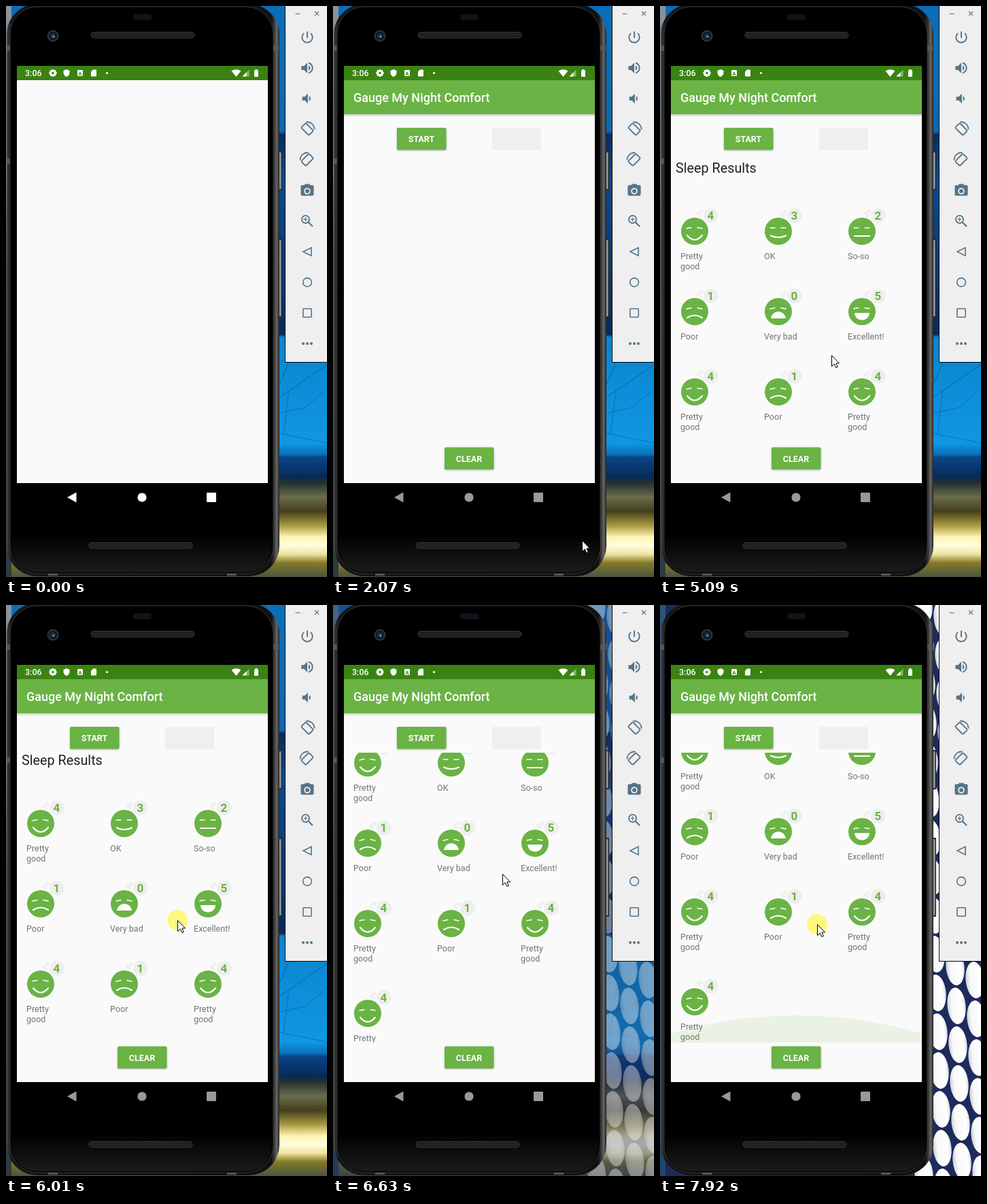
An HTML page with a canvas for the animation above (8000 ms loop, 472 by 839 pixels).

```html
<!DOCTYPE html>
<html lang="en">
<head>
<meta charset="utf-8">
<title>Sleep tracker</title>
<style>
html, body { margin: 0; width: 100%; height: 100%; overflow: hidden; background: #000; }
canvas { display: block; width: 472px; height: 839px; }
</style>
</head>
<body>
<canvas id="stage" width="472" height="839"></canvas>
<script>
const W = 472, H = 839, LOOP = 8000;
const GREEN = '#6ab344', SLATE = '#567487';
const canvas = document.getElementById('stage');
const c = canvas.getContext('2d');

// Bursts of screen updates: start, end, number of steps
const BURSTS = [
  [0, 0, 1], [220, 460, 4], [680, 770, 2], [1070, 1070, 1], [1690, 1690, 1],
  [1840, 1920, 2], [2070, 2070, 1], [2230, 2230, 1], [2760, 3380, 9],
  [3840, 4450, 9], [4770, 5090, 5], [5540, 5540, 1], [5690, 6470, 11],
  [6630, 6630, 1], [6810, 7140, 7], [7310, 7770, 7], [7920, 7920, 1]
];
const POINTER = [
  [220, 346, 825], [460, 366, 785], [2680, 366, 785], [3070, 300, 560],
  [3215, 274, 482], [3380, 284, 521], [3760, 284, 521], [3840, 243, 505],
  [4140, 113, 390], [4450, 284, 422], [4700, 284, 422], [5090, 252, 513],
  [5610, 252, 513], [6002, 252, 463], [6392, 250, 402], [6470, 249, 393],
  [6630, 249, 395], [6920, 242, 523], [7140, 238, 535], [7235, 238, 535],
  [7770, 231, 469]
];
const SCROLL = [
  [5850, 0], [6002, 10], [6392, 81], [6470, 92], [6630, 99], [6920, 104],
  [7310, 104], [7770, 116]
];
const NAV = [[600, 255], [680, 215], [770, 175], [1070, 153]];
const APP = [[1600, 0], [1690, .5], [1840, .85], [1920, 1]];
const WALL = [[6560, 0], [6630, .4], [6920, 1]];
const GLOW = [[7400, 0], [7770, 1]];

const ICONS = {
  power: 'M13 3h-2v10h2V3zm4.83 2.17l-1.42 1.42C17.99 7.86 19 9.81 19 12c0 3.87-3.13 7-7 7s-7-3.13-7-7c0-2.19 1.01-4.14 2.58-5.42L6.17 5.17C4.23 6.82 3 9.26 3 12c0 4.97 4.03 9 9 9s9-4.03 9-9c0-2.74-1.23-5.18-3.17-6.83z',
  louder: 'M3 9v6h4l5 5V4L7 9H3zm13.5 3c0-1.77-1.02-3.29-2.5-4.03v8.05c1.48-.73 2.5-2.25 2.5-4.02zM14 3.23v2.06c2.89.86 5 3.54 5 6.71s-2.11 5.85-5 6.71v2.06c4.01-.91 7-4.49 7-8.77s-2.99-7.86-7-8.77z',
  quieter: 'M18.5 12c0-1.77-1.02-3.29-2.5-4.03v8.05c1.48-.73 2.5-2.25 2.5-4.02zM5 9v6h4l5 5V4L9 9H5z',
  camera: 'M9 2L7.17 4H4c-1.1 0-2 .9-2 2v12c0 1.1.9 2 2 2h16c1.1 0 2-.9 2-2V6c0-1.1-.9-2-2-2h-3.17L15 2H9z',
  shield: 'M12 1L3 5v6c0 5.55 3.84 10.74 9 12 5.16-1.26 9-6.45 9-12V5z',
  card: 'M18 2h-8L4 8v12c0 1.1.9 2 2 2h12c1.1 0 2-.9 2-2V4c0-1.1-.9-2-2-2z'
};

function snap(t) {
  const [a, b, n] = BURSTS.filter(s => s[0] <= t).pop();
  if (n === 1 || t >= b) return b;
  const d = (b - a) / (n - 1);
  return a + Math.floor((t - a + 15) / d) * d;
}

// Linear value of a keyed track at time t
function at(keys, t, k = 1) {
  if (t <= keys[0][0]) return keys[0][k];
  const i = keys.findIndex(p => p[0] >= t);
  if (i < 0) return keys[keys.length - 1][k];
  const p = keys[i - 1], q = keys[i];
  return p[k] + (q[k] - p[k]) * (t - p[0]) / (q[0] - p[0]);
}

function rect(x, y, w, h, fill, r = 0) {
  c.fillStyle = fill;
  c.beginPath();
  c.roundRect(x, y, w, h, r);
  c.fill();
}
function disc(x, y, r, fill) {
  c.fillStyle = fill;
  c.beginPath();
  c.arc(x, y, r, 0, 7);
  c.fill();
}
function poly(points, fill) {
  c.beginPath();
  for (let i = 0; i < points.length; i += 2) c.lineTo(points[i], points[i + 1]);
  c.closePath();
  if (fill) { c.fillStyle = fill; c.fill(); }
}
function line(points, color, width) {
  c.beginPath();
  for (let i = 0; i < points.length; i += 2) c.lineTo(points[i], points[i + 1]);
  c.strokeStyle = color;
  c.lineWidth = width;
  c.stroke();
}
function text(s, x, y, size, color, weight = 400, align = 'left') {
  c.font = `${weight} ${size}px Roboto, sans-serif`;
  c.textAlign = align;
  c.fillStyle = color;
  c.fillText(s, x, y);
}
function icon(name, x, y, size, color) {
  c.save();
  c.translate(x - size / 2, y - size / 2);
  c.scale(size / 24, size / 24);
  c.fillStyle = color;
  c.fill(new Path2D(ICONS[name]));
  c.restore();
}
function ramp(x0, y0, x1, y1, stops) {
  const g = c.createLinearGradient(x0, y0, x1, y1);
  stops.forEach(([p, color]) => g.addColorStop(p, color));
  return g;
}

function blueWall() {
  rect(0, 0, W, H, ramp(0, 0, 0, H, [
    [0, '#0b6eb8'], [.22, '#0a68b0'], [.225, '#062c5c'], [.3, '#0a4a8c'], [.5, '#06366c'],
    [.575, '#052a58'], [.58, '#0a84cc'], [.62, '#0b88d2'], [.765, '#1097e2'],
    [.785, '#0a72bc'], [.79, '#0a4688'], [.825, '#062a58'], [.835, '#25302f'],
    [.86, '#6a6c4c'], [.885, '#453f1c'], [.91, '#a89a40'], [.93, '#fff4b4'],
    [.945, '#fffde0'], [.96, '#f0e3a0'], [.975, '#857a28'], [1, '#4b5540']
  ]));
  line([402, 575, 472, 527], '#0a63a4', 1);
  line([402, 556, 416, 523], '#0a63a4', 1);
  line([402, 598, 440, 590, 472, 562], '#0a6fb4', 1);
  line([416, 565, 408, 630], '#0a6fb4', 1);
  line([402, 628, 472, 642], '#0b70b8', 1);
  rect(0, 0, 8, 230, ramp(0, 0, 0, 230, [[0, '#8a949c'], [1, '#687580']]));
  rect(0, 230, 8, 609, ramp(0, 230, 0, H, [[0, '#8a949a'], [.2, '#4a545c'], [1, '#2c3a40']]));
}

function dotWall() {
  rect(0, 0, W, H, '#1d2b5c');
  for (let i = -1; i < 4; i++) {
    for (let j = -10; j < 7; j++) {
      const x = 407 + i * 29 + j * 2, y = 570 + j * 57 + i * 19;
      c.save();
      c.translate(x, y);
      c.rotate(-.1);
      c.fillStyle = ramp(-14, 0, 14, 0, [[0, '#c9ccd2'], [.25, '#f8f8f8'], [.8, '#fff'], [1, '#d6d8de']]);
      c.beginPath();
      c.ellipse(0, 0, 13.5, 27, 0, 0, 7);
      c.fill();
      c.restore();
    }
  }
  rect(0, 0, 8, H, ramp(0, 0, 0, H, [[0, '#2f567a'], [.5, '#1f446a'], [1, '#24466c']]));
}

function grill(x, y) {
  rect(x, y, 153, 9.5, '#3b3b3b', 5);
  rect(x + 1, y + 1, 151, 7.5, '#1d1d1d', 4);
  for (let i = 4; i < 150; i += 3) rect(x + i, y + 3, 1, 3.5, '#303030');
}

function phone() {
  for (const [y, h] of [[213, 58], [342, 116]]) {
    rect(399, y, 7, h, '#2a2a2a', 1);
    rect(401, y + 2, 3.5, h - 4, '#9a9a9a', 1);
  }
  rect(1, -3, 401, 841, ramp(0, 0, 402, 0, [
    [0, '#5a5c5e'], [.008, '#303234'], [.02, '#151515'], [.97, '#111'],
    [.982, '#3a3a3a'], [.99, '#686868'], [1, '#222']
  ]), 45);
  for (const [x, y] of [[1, 58], [1, 224], [392, 58]]) rect(x, y, 9, 8, '#56595b');
  rect(6, 1, 387, 833, '#000', 40);
  c.strokeStyle = '#3a3a3a';
  c.lineWidth = 1;
  c.stroke();
  rect(8, 775, 383, 57, ramp(0, 775, 0, 832, [[0, '#000'], [1, '#1b1b1b']]), [0, 0, 37, 37]);
  for (const x of [62, 325]) rect(x, 834, 14, 3, '#555');
  rect(187, 12, 27, 9, '#11131a', 4);
  grill(124.5, 38);
  grill(121.5, 788);
  disc(69, 44, 8.5, '#343434');
  disc(69, 44, 6.5, '#15181c');
  disc(69, 44, 3.5, '#15395c');
  disc(70, 45, 1.3, '#6ba6d8');
}

function rotateIcon(y, flip) {
  c.save();
  c.translate(443, y);
  c.scale(flip, 1);
  c.strokeStyle = SLATE;
  c.lineWidth = 1.8;
  c.beginPath();
  c.arc(0, 0, 10.5, -1.75, .05);
  c.stroke();
  c.rotate(Math.PI / 4);
  c.beginPath();
  c.roundRect(-8, -4.8, 16, 9.6, 1.5);
  c.stroke();
  c.restore();
}

function panel() {
  rect(410, 0, 62, 524, '#0a0a0a');
  rect(411, 0, 61, 523, '#efeff0');
  line([425.5, 11.5, 432.5, 11.5], '#777', 1.2);
  line([454, 8, 460, 14], '#777', 1.2);
  line([460, 8, 454, 14], '#777', 1.2);
  icon('power', 443, 46, 23, SLATE);
  icon('louder', 443, 91, 23, SLATE);
  icon('quieter', 442, 136, 22, SLATE);
  rotateIcon(181, 1);
  rotateIcon(226, -1);
  icon('camera', 443, 271, 23, SLATE);
  disc(443, 272, 4.8, '#efeff0');
  disc(443, 272, 3, SLATE);
  c.strokeStyle = SLATE;
  c.lineWidth = 1.8;
  c.beginPath();
  c.arc(440.5, 313.5, 5.6, 0, 7);
  c.stroke();
  line([444.7, 317.7, 451, 324], SLATE, 2.2);
  line([437.5, 313.5, 443.5, 313.5], SLATE, 1.2);
  line([440.5, 310.5, 440.5, 316.5], SLATE, 1.2);
  c.lineWidth = 1.6;
  poly([437, 361, 449, 355, 449, 367]);
  c.stroke();
  c.beginPath();
  c.arc(443, 406, 6.4, 0, 7);
  c.stroke();
  c.beginPath();
  c.roundRect(436.8, 444.8, 12.4, 12.4, 1);
  c.stroke();
  for (const x of [437, 443, 449]) disc(x, 496, 2, SLATE);
}

function statusBar() {
  rect(16, 88, 369, 21, '#3a8212');
  text('3:06', 28, 103, 12.5, '#fff', 500);
  for (let i = 0; i < 4; i++) {
    c.save();
    c.translate(69, 98.5);
    c.rotate(i * Math.PI / 4);
    rect(-1.4, -5.6, 2.8, 11.2, '#fff', .5);
    c.restore();
  }
  disc(69, 98.5, 4.2, '#fff');
  disc(69, 98.5, 1.8, '#3a8212');
  icon('shield', 89, 98.5, 12, '#fff');
  rect(105, 94, 8, 9, '#fff', 1);
  text('A', 109, 101.5, 8, '#3a8212', 700, 'center');
  icon('card', 129, 98.5, 12, '#fff');
  disc(148.5, 98.5, 1.6, '#fff');
  c.fillStyle = '#fff';
  c.beginPath();
  c.moveTo(338.5, 104);
  c.lineTo(331.5, 95.5);
  c.quadraticCurveTo(338.5, 91, 345.5, 95.5);
  c.fill();
  poly([347.5, 103.5, 357.5, 93.5, 357.5, 103.5], 'rgba(255,255,255,.4)');
  poly([347.5, 103.5, 353.5, 97.5, 353.5, 103.5], '#fff');
  rect(365, 94.5, 6, 9.5, '#fff', .8);
  rect(366.5, 93, 3, 2, '#fff');
}

function navBar(v) {
  const color = `rgb(${v},${v},${v})`;
  poly([90, 722, 103.5, 714.5, 103.5, 729.5], color);
  disc(200, 722, 6.6, color);
  rect(295, 715, 14, 14, color, 1);
}

function button(label, x, y) {
  c.save();
  c.shadowColor = 'rgba(0,0,0,.28)';
  c.shadowBlur = 3;
  c.shadowOffsetY = 1;
  rect(x, y, 72.5, 32.5, GREEN, 2);
  c.restore();
  text(label, x + 36, y + 21, 12.5, '#fff', 700, 'center');
}

function face(x, y, score) {
  for (const [dx, dy, r] of [[5, -26, 2.4], [10, -29, 2.6], [8, -23, 2]]) {
    disc(x + dx, y + dy, r, '#eeeeee');
  }
  disc(x + 24, y - 23, 11, '#eeeeee');
  text(score, x + 23.5, y - 17, 17, GREEN, 700, 'center');
  disc(x, y, 20, GREEN);
  c.lineCap = 'round';
  const tilt = score === 5 || score === 4 ? .8 : score < 2 ? 1 : 0;
  line([x - 12, y - 5 + tilt, x - 5, y - 5 - tilt / 2], '#fff', 1.5);
  line([x + 4, y - 5 - tilt / 2, x + 11, y - 5 + tilt], '#fff', 1.5);
  c.strokeStyle = c.fillStyle = '#fff';
  c.lineWidth = 2.2;
  c.beginPath();
  if (score === 0) {
    c.moveTo(x - 11, y + 10);
    c.bezierCurveTo(x - 9, y - 3.5, x + 9, y - 3.5, x + 11, y + 10);
    c.fill();
  } else if (score === 5) {
    c.moveTo(x - 11, y + 2);
    c.lineTo(x + 11, y + 2);
    c.bezierCurveTo(x + 10, y + 16, x - 10, y + 16, x - 11, y + 2);
    c.fill();
  } else {
    const [ends, bend] = { 1: [9, -7], 2: [7, 0], 3: [6.5, 5], 4: [6, 13] }[score];
    c.moveTo(x - 11, y + ends);
    c.quadraticCurveTo(x, y + ends + bend, x + 11, y + ends);
    c.stroke();
  }
  c.lineCap = 'butt';
}

const LABELS = ['Very bad', 'Poor', 'So-so', 'OK', 'Pretty good', 'Excellent!'];
const NIGHTS = [4, 3, 2, 1, 0, 5, 4, 1, 4, 4];

function list(scroll, glow) {
  c.save();
  c.beginPath();
  c.rect(16, 217, 369, 426);
  c.clip();
  text('Sleep Results', 23, 245 - scroll, 19.8, '#222');
  NIGHTS.forEach((score, i) => {
    const row = Math.floor(i / 3);
    const x = 51 + i % 3 * 123;
    const y = 331 + row * 118 + (row === 3 ? 14 : 0) - scroll;
    face(x, y, score);
    const words = score === 4 ? LABELS[4].split(' ') : [LABELS[score]];
    words.forEach((w, k) => text(w, x - 21, y + 41 + k * 14.8, 12.56, '#747474'));
  });
  if (glow > 0) {
    const rise = 40 * glow;
    c.fillStyle = `rgba(106,179,68,${.12 * glow})`;
    c.beginPath();
    c.moveTo(16, 643);
    c.lineTo(16, 643 - rise * .33);
    c.quadraticCurveTo(200, 643 - rise * 1.67, 385, 643 - rise * .33);
    c.lineTo(385, 643);
    c.fill();
  }
  c.restore();
}

function app(t) {
  c.save();
  c.globalAlpha = at(APP, t);
  rect(16, 159, 369, 4, ramp(0, 159, 0, 163, [[0, 'rgba(0,0,0,.2)'], [1, 'rgba(0,0,0,0)']]));
  rect(16, 109, 369, 50, GREEN);
  text('Gauge My Night Comfort', 30, 141, 18, '#fff', 500);
  if (t >= 2070) button('START', 94, 179);
  else rect(94, 179, 72.5, 33, '#efefef', 2);
  rect(234, 179, 72, 33, '#efefef', 2);
  button('CLEAR', 164, 648.5);
  c.restore();
  if (t >= 2230) list(at(SCROLL, t), at(GLOW, t));
}

function pointer(t) {
  if (t < 220) return;
  const x = Math.round(at(POINTER, t)), y = Math.round(at(POINTER, t, 2));
  if (t >= 5540 && t < 6630 || t >= 7310) disc(x, y, 15, 'rgba(255,248,50,.63)');
  c.save();
  c.translate(x + .5, y + .5);
  poly([0, 0, 0, 16, 3.8, 12.5, 6.3, 18, 8.8, 17, 6.4, 11.5, 11, 11.5], '#fff');
  c.strokeStyle = '#000';
  c.lineWidth = 1;
  c.stroke();
  c.restore();
}

function draw(time) {
  const t = snap(time);
  blueWall();
  c.globalAlpha = at(WALL, t);
  if (c.globalAlpha > 0) dotWall();
  c.globalAlpha = 1;
  phone();
  panel();
  rect(16, 109, 369, 592, '#fafafa');
  statusBar();
  navBar(Math.round(at(NAV, t)));
  if (t >= 1690) app(t);
  pointer(t);
}

const start = performance.now();
function tick() {
  draw((performance.now() - start) % LOOP);
  requestAnimationFrame(tick);
}
tick();
</script>
</body>
</html>
```
